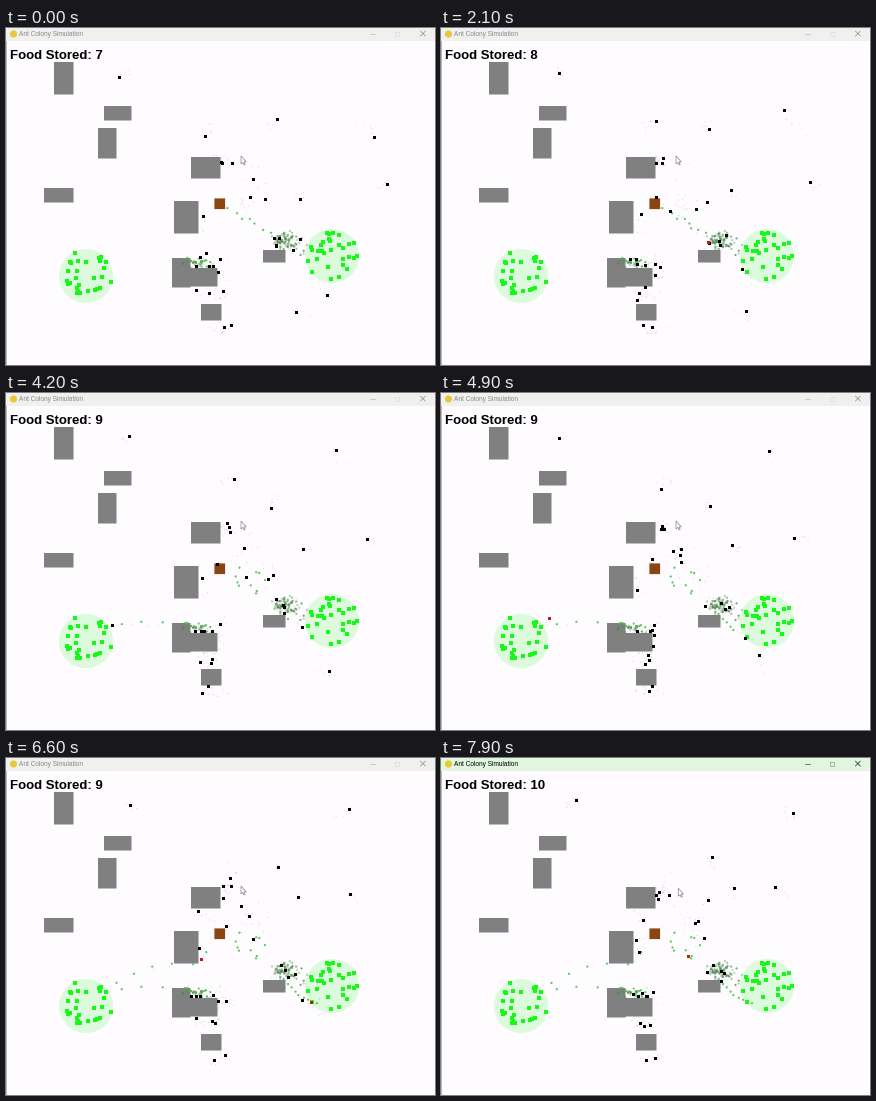
A matplotlib script that plays this animation: 429x337 px, repeating every 8000 ms.

```python
import numpy as np
import matplotlib.pyplot as plt
from matplotlib.animation import FuncAnimation
from matplotlib.patches import Circle, Polygon, Rectangle

W, H, DPI = 429, 337, 64
FRAMES, STEP = 80, 100
PX = 72 / DPI
CLOCK = np.arange(FRAMES) * STEP / 1000
NEST = (208.4, 170.4, 219.1, 181.1)
FOOD_SITES = ((80, 248), (326, 228))
BLOCKS = [(48, 34, 67, 66), (98, 78, 125, 92), (92, 100, 110, 130),
          (38, 160, 67, 174), (185, 129, 214, 150), (168, 173, 192, 205),
          (166, 230, 184, 259), (184, 240, 211, 258), (195, 276, 215, 292),
          (257, 222, 279, 234)]
DELIVERED = (1.9, 3.1, 7.2)
FOCUS = 7.2
rng = np.random.default_rng(4)


# --- ants ---

def push_out(p, pad=1.5):
    """Move a point inside a block to that block's nearest edge."""
    for x0, y0, x1, y1 in BLOCKS:
        gaps = [p[0] - x0 + pad, x1 + pad - p[0], p[1] - y0 + pad, y1 + pad - p[1]]
        if min(gaps) > 0:
            side = int(np.argmin(gaps))
            p[side // 2] += gaps[side] * (-1 if side % 2 == 0 else 1)
    return p


def sway():
    """Smooth random wobble in x and y, about one unit wide."""
    rate = rng.uniform(0.1, 0.6, (3, 2, 1))
    phase = rng.uniform(0, 1, (3, 2, 1))
    return np.sin(2 * np.pi * (rate * CLOCK + phase)).sum(axis=0).T / 1.22


paths, loads = [], []


def walk(keys, reach=(0.6, 0.6), load=(9, 9)):
    """Pass the (t, x, y) keys while wandering; carry food during load."""
    t, x, y = np.transpose(keys)
    track = np.column_stack([np.interp(CLOCK, t, x), np.interp(CLOCK, t, y)])
    track += sway() * reach
    paths.append([push_out(p) for p in track])
    loads.append(load)


def mill(count, center, spread):
    """Ants that stay around one spot."""
    for _ in range(count):
        home = np.array(center) + 0.6 * np.array(spread) * rng.uniform(-1, 1, 2)
        walk([(0, *home)], 0.7 * np.array(spread))


for start, middle, end in [((118, 48), (120, 46), (133, 46)),
                           ((370, 110), (326, 58), (352, 55)),
                           ((381, 160), (361, 148), (333, 127)),
                           ((266, 90), (268, 113), (274, 104)),
                           ((200, 104), (224, 86), (225, 136)),
                           ((293, 170), (295, 156), (291, 128)),
                           ((288, 288), (328, 278), (280, 221))]:
    walk([(0, *start), (4, *middle), (8, *end)], (2.5, 2.5))

mill(3, (217, 133), (5, 6))
mill(3, (246, 168), (13, 14))
mill(1, (197, 188), (3, 16))
mill(4, (277, 212), (8, 6))
mill(6, (205, 238), (11, 8))
mill(3, (203, 265), (8, 5))
mill(2, (211, 299), (9, 5))

walk([(0, 274, 212), (0.9, 276, 214), (1.95, 214, 172), (3.5, 238, 156),
      (6.6, 243, 158), (8, 259, 164)], load=(0.8, DELIVERED[0]))
walk([(0, 288, 222), (2.1, 267, 214), (3.1, 217, 176), (4.9, 211, 167),
      (6.6, 193, 155), (8, 204, 162)], load=(1.5, DELIVERED[1]))
walk([(0, 190, 240), (2.1, 190, 232), (3.5, 150, 231), (4.5, 89, 234), (5.6, 140, 212),
      (6.6, 196, 202), (7.2, 207, 178), (8, 194, 183)], load=(4.5, DELIVERED[2]))
walk([(0, 321, 267), (3.5, 289, 222), (4.9, 304, 246), (5.9, 315, 240),
      (6.6, 306, 244), (8, 243, 195)], load=(5.9, 9))
paths, loads = np.array(paths), np.array(loads)


# --- scent: place, lifetime and colour of every dot ---

scent, life, tint = [], [], []


def cloud(count, center, spread, lean=0):
    """Faded grey-green dots around a spot; lean slants the cloud."""
    for _ in range(count):
        dx, dy = rng.normal(size=2).clip(-2, 2)
        green = rng.random()
        scent.append((center[0] + spread[0] * dx, center[1] + spread[1] * dy + lean * dx))
        life.append((-1, 9))
        tint.append((0.4 - 0.15 * green, 0.43 + 0.25 * green, 0.4 - 0.15 * green,
                     rng.uniform(0.3, 0.85)))


def trail(points, gap, jitter, born=-1, gone=9, speed=60):
    """Green dots every gap px along a line, laid at speed px/s."""
    pts = np.array(points, float)
    dist = np.append(0, np.cumsum(np.hypot(*np.diff(pts, axis=0).T)))
    for d in np.arange(0, dist[-1] + 1, gap):
        spot = [np.interp(d, dist, pts[:, i]) for i in (0, 1)]
        scent.append(spot + jitter * rng.normal(size=2))
        life.append((born + d / speed, gone))
        tint.append((0.25, 0.78, 0.25, 0.9))


cloud(65, (277, 212), (5.5, 4.5))
cloud(24, (289, 216), (6, 5), lean=3)
cloud(30, (191, 235), (7, 2.2))
trail([(182, 231), (190, 235), (207, 233)], 4, 1)
trail([(222, 181), (240, 190), (266, 206)], 8, 1.5, gone=3)
trail([(253, 198), (230, 190), (234, 174), (258, 179), (252, 198)], 9, 2.5, born=2.1)
trail([(283, 226), (295, 239), (311, 245)], 5, 0.6, born=4.1, speed=20)
trail([(178, 229), (111, 231), (89, 234)], 21, 0.6, born=2.9)
trail([(92, 233), (134, 214), (155, 205), (192, 206), (206, 185)], 20, 0.6, born=4.6)
scent, life, tint = np.array(scent), np.array(life), np.array(tint)

# faint specks left behind by every ant
SPECK_GAP, SPECK_LIFE = 3, 24
scatter = rng.normal(0, 1.5, (len(paths), FRAMES + SPECK_LIFE, 2))


def specks(n):
    first = -(-(n - SPECK_LIFE) // SPECK_GAP) * SPECK_GAP
    ks = np.arange(first, n, SPECK_GAP)
    pts = paths[:, np.abs(ks)] + scatter[:, ks + SPECK_LIFE]
    shade = np.full((len(paths), len(ks), 4), 0.55)
    shade[..., 3] = 0.32 * (1 - (n - ks) / (SPECK_LIFE + 3))
    return pts.reshape(-1, 2), shade.reshape(-1, 4)


def food(center, count=30, radius=26):
    r = radius * np.sqrt(rng.random(count))
    a = rng.uniform(0, 2 * np.pi, count)
    return np.column_stack([center[0] + r * np.cos(a), center[1] + r * np.sin(a)])


# --- stage ---

fig = plt.figure(figsize=(W / DPI, H / DPI), dpi=DPI, facecolor="#fefcff")
ax = fig.add_axes([0, 0, 1, 1])
ax.set(xlim=(0, W), ylim=(H, 0))
ax.axis("off")


def box(x0, y0, x1, y1, color, z=1):
    return ax.add_patch(Rectangle((x0, y0), x1 - x0, y1 - y0, fc=color, lw=0,
                                  snap=False, zorder=z))


def dots(pts, size, color, z, marker="s"):
    x, y = np.transpose(pts)
    return ax.scatter(x, y, s=(size * PX) ** 2, c=color, marker=marker, lw=0, zorder=z)


def label(x, y, text, size, **style):
    return ax.text(x, y, text, family="Liberation Sans", size=size * PX, zorder=7, **style)


def stroke(*xy):
    return ax.plot(*np.transpose(xy), lw=0.7 * PX, zorder=7)[0]


for site in FOOD_SITES:
    ax.add_patch(Circle(site, 27, fc="#dcfbdc", lw=0))
for x0, y0, x1, y1 in BLOCKS:
    box(x0, y0, x1 + 0.5, y1 + 0.5, "#808080", 2)
faint = dots([(0, 0)], 1.4, "#dddddd", 1.5, "o")
green = dots(scent, 2.2, tint, 3, "o")
dots(np.vstack([food(site) for site in FOOD_SITES]), 3.5, "#18f818", 4)
box(*NEST, "#8b4513", 4)
ants = dots(paths[:, 0], 3, "black", 5)

bar = box(0, 0, W, 13, "#f0f1ee", 6)
box(0, 13, 0.6, H, "#8c8c8c", 6)
ax.add_patch(Circle((7.5, 6), 3.6, fc="#e8c93a", lw=0, zorder=7))
title = label(13, 8.3, "Ant Colony Simulation", 6.5)
score = label(4, 30.7, "", 13.2, weight="bold")
minimise = stroke((364, 5.5), (369, 5.5))
maximise = stroke((389, 3.5), (393, 3.5), (393, 7.5), (389, 7.5), (389, 3.5))
close = [stroke((414.5, 3.2), (419.3, 8)), stroke((414.5, 8), (419.3, 3.2))]

ARROW = np.array([(0, 0), (0, 8), (1.8, 6.4), (3, 9), (4.2, 8.4), (3, 5.9), (5.3, 5.9)])
cursor = ax.add_patch(Polygon(ARROW, fc="white", ec="#858585", lw=0.7 * PX, zorder=8))


def draw(n):
    t = CLOCK[n] + 1e-6
    pts, shade = specks(n)
    faint.set_offsets(pts)
    faint.set_facecolors(shade)

    rgba = tint.copy()
    rgba[:, 3] *= (life[:, 0] <= t) & (t < life[:, 1])
    green.set_facecolors(rgba)

    loaded = (loads[:, 0] <= t) & (t < loads[:, 1])
    ants.set_offsets(paths[:, n])
    ants.set_facecolors(["#c8141e" if full else "black" for full in loaded])
    score.set_text(f"Food Stored: {7 + sum(t >= d for d in DELIVERED)}")

    active = t >= FOCUS
    title.set_color("black" if active else "#8a8a8a")
    minimise.set_color("#555555" if active else "#bbbbbb")
    maximise.set_color("#999999" if active else "#dddddd")
    for line in close:
        line.set_color("#222222" if active else "#8c8c8c")
    bar.set_facecolor("#e2f5de" if t >= FOCUS + 0.1 else "#f0f1ee")
    shift = 2.2 * np.clip((t - FOCUS) / 0.3, 0, 1)
    cursor.set_xy(ARROW + (235 + shift, 128 + shift))
    return []


anim = FuncAnimation(fig, draw, frames=FRAMES, interval=STEP, repeat=True,
                     repeat_delay=0, blit=False)
plt.show()
```
